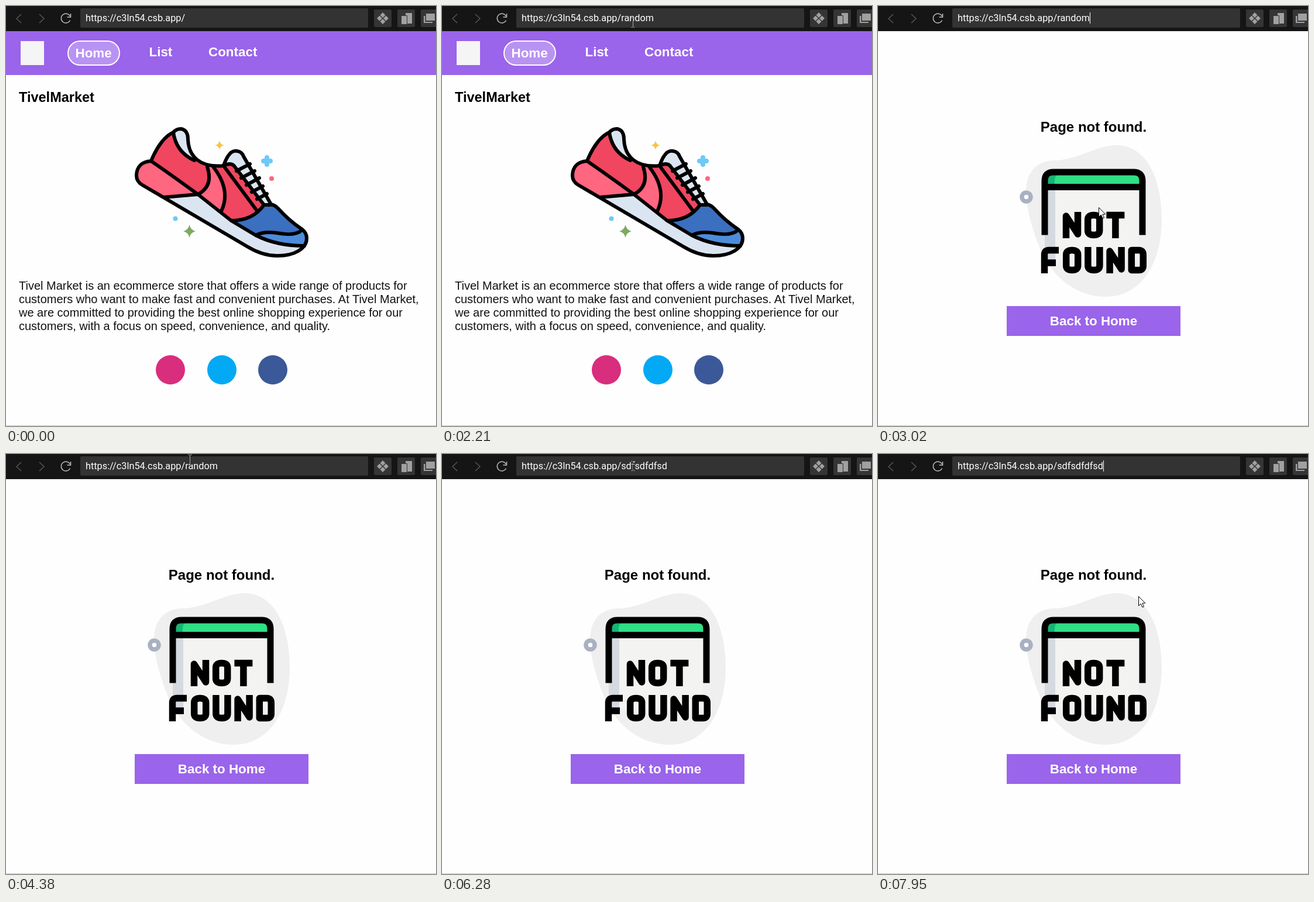
An HTML page that plays this animation: 735 px wide and 718 px high, repeating every 8000 ms.

```html
<!DOCTYPE html>
<html lang="en">
<head>
<meta charset="utf-8">
<title>Store page demo</title>
<style>
html, body { margin: 0; width: 100%; height: 100%; overflow: hidden; background: #fefefe; }
svg { display: block; font-family: "Liberation Sans", Arial, sans-serif; }
.bold { font-weight: bold; }
.nav { font-weight: bold; font-size: 22.4px; fill: #fff; }
.line { fill: none; stroke: #000; stroke-width: 6; stroke-linecap: round; stroke-linejoin: round; }
#ibeam { mix-blend-mode: difference; }
</style>
</head>
<body>
<svg width="735" height="718" viewBox="0 0 735 718">
  <rect width="735" height="718" fill="#fefefe"/>
  <rect y="717" width="735" height="1" fill="#c8c8c8"/>

  <g id="home">
    <rect y="43" width="735" height="75" fill="#9a64eb"/>
    <rect x="25" y="60" width="40" height="41" fill="#f5f5f5"/>
    <rect x="106" y="60" width="88" height="41" rx="20.5" fill="#b993f2" stroke="#fff" stroke-width="2"/>
    <g class="nav">
      <text x="118.5" y="88">Home</text>
      <text x="244.5" y="86">List</text>
      <text x="346" y="86">Contact</text>
    </g>
    <text class="bold" x="22" y="164" font-size="23.5">TivelMarket</text>

    <g id="shoe">
      <path fill="#f0465f" d="M223 290C223 275 232 266 248 265C258 238 272 222 286 215L318 262L354 276L388 270L441 340Q422 367 385 367L328 322L270 327L233 306Q223 300 223 290"/>
      <path fill="#ff6680" d="M248 265L328 322L270 327L233 306Q223 300 223 290C223 275 232 266 248 265M346 274Q354 308 328 322L368 351Q384 315 355 276Z"/>
      <path fill="#dbe5f1" d="M286 216Q291 210 299 210Q311 212 311 228Q311 248 322 264Q288 247 286 216M372 273C378 255 386 246 395 248Q403 249 406 257L453 339L441 340L390 271ZM270 327L328 322L385 367L427 392Q468 409 510 410Q494 427 462 427Q438 427 412 411Z"/>
      <path fill="#3b6fc0" d="M385 367Q422 367 441 340Q455 338 463 345Q480 363 505 381L514 393L510 410Q462 410 427 392Z"/>
      <path fill="#4d8cdb" d="M427 392Q440 385 463 388Q494 394 506 383Q520 392 510 410Q462 410 427 392"/>
      <g class="line">
        <path d="M223 290C223 275 232 266 248 265C258 240 272 222 286 216Q291 210 299 210Q311 212 311 228C312 258 333 277 372 273C378 255 386 246 395 248Q403 249 406 257L453 339Q459 340 465 346Q484 367 505 381Q514 387 514 397C514 415 493 427 464 427Q438 427 412 411L233 306Q223 300 223 290Z"/>
        <path d="M248 265Q280 287 328 322L385 367L427 392Q462 410 510 410M270 327L328 322Q355 308 344 275M286 216Q291 250 322 264M355 276Q385 315 368 351M372 273Q386 266 392 276L441 340Q422 367 385 367M374 276L429 350M441 340H453M427 392Q440 385 463 388Q494 394 506 383"/>
        <path d="M394 282L417 270M402 294L425 282M411 306L433 294M420 318L439 308M429 330L446 321"/>
      </g>
      <path fill="#fcc23f" d="M365 230Q366 237 373 238Q366 239 365 246Q364 239 357 238Q364 237 365 230"/>
      <path fill="#7fa862" d="M313.5 374Q315.5 383 324 385Q315.5 387 313.5 396Q311.5 387 303 385Q311.5 383 313.5 374"/>
      <path d="M446 259V271M440 265H452" stroke="#6dc9f7" stroke-width="8" stroke-linecap="round"/>
      <circle cx="454" cy="295" r="4" fill="#ff6680"/>
      <circle cx="289.5" cy="363.5" r="4" fill="#6dc9f7"/>
    </g>

    <g font-size="20" fill="#111">
      <text x="22" y="485">Tivel Market is an ecommerce store that offers a wide range of products for</text>
      <text x="22" y="508">customers who want to make fast and convenient purchases. At Tivel Market,</text>
      <text x="22" y="531">we are committed to providing the best online shopping experience for our</text>
      <text x="22" y="554">customers, with a focus on speed, convenience, and quality.</text>
    </g>
    <circle cx="281" cy="622" r="25" fill="#d92d7d"/>
    <circle cx="369" cy="622" r="25" fill="#03a9f4"/>
    <circle cx="456" cy="622" r="25" fill="#3b5998"/>
  </g>

  <g id="missing">
    <text class="bold" x="368.5" y="215" font-size="24" text-anchor="middle">Page not found.</text>
    <path fill="#efefef" d="M300 264C345 263 370 238 410 238C462 240 485 300 485 365C485 440 450 497 389 497C340 497 300 465 279 420C266 388 253 350 253 315C254 285 270 265 300 264"/>
    <path fill="#f3f3f1" d="M291 315H446V435H291Z"/>
    <path fill="#d5dae1" d="M285 315H303V436H285Z"/>
    <path fill="#2fdf84" d="M290 304V296Q290 289 298 289H439Q447 289 447 296V304Z"/>
    <path fill="#17b574" d="M290 304V296Q290 289 298 289H307Q302 291 302 298V304Z"/>
    <path fill="none" stroke="#000" stroke-width="11" d="M285 391.5V299Q285 284 300 284H437Q452 284 452 299V391.5M285 309.5H452"/>
    <circle cx="253.5" cy="326.5" r="7.5" fill="#fff" stroke="#a9b1c2" stroke-width="7.5"/>
    <g id="letters" fill="none" stroke="#000" stroke-width="11.5" stroke-linejoin="round"></g>
    <rect x="220" y="513" width="297" height="51" fill="#9a64eb"/>
    <text class="nav" x="368.5" y="546" text-anchor="middle">Back to Home</text>
  </g>

  <g id="browser">
    <rect width="735" height="43" fill="#151515"/>
    <rect x="127" y="4" width="492" height="33" rx="2" fill="#333"/>
    <g fill="none" stroke="#555" stroke-width="1.5">
      <path d="M26 14L18 21.5L26 29M57 14L65 21.5L57 29"/>
      <path stroke="#bbb" d="M109.5 17.5A8 8 0 1 0 109.5 24.5M110.5 13V19H104.5"/>
    </g>
    <g fill="#353535">
      <rect x="629" y="6" width="30" height="30" rx="2"/>
      <rect x="669" y="6" width="30" height="30" rx="2"/>
      <rect x="709" y="6" width="30" height="30" rx="2"/>
    </g>
    <g fill="#a0a0a0">
      <path d="M644 11L648.5 15.5L644 20L639.5 15.5ZM644 22L648.5 26.5L644 31L639.5 26.5ZM638.5 16.5L643 21L638.5 25.5L634 21ZM649.5 16.5L654 21L649.5 25.5L645 21Z"/>
      <path d="M683 12H694V30H686V16H683ZM676 17H685V31H676Z"/>
      <path d="M718 13H733V25H718ZM714 17H716.5V27H729V29H714Z"/>
    </g>
    <rect id="selection" x="306" y="11" width="56" height="19" fill="#338fff"/>
    <text id="url" x="136" y="26" font-size="16.3" fill="#fff" font-family="Roboto, sans-serif"></text>
    <rect id="caret" y="11" width="1" height="19" fill="#fff"/>
  </g>

  <path id="arrow" d="M.5 .5V16.5L4.3 13L7 19L9.5 18L6.9 12H11.8Z" fill="#fff" stroke="#000"/>
  <path id="ibeam" d="M-3 -8H-1L0 -7L1 -8H3M0 -7V7M-3 8H-1L0 7L1 8H3" fill="none" stroke="#ddd"/>
</svg>

<script>
const $ = id => document.getElementById(id);
const LOOP = 8000;

const glyphs = {
  N: 'M5.5 45V7L25.5 38V0',
  O: 'M5.5 13q0-7.5 10-7.5t10 7.5V32q0 7.5-10 7.5t-10-7.5z',
  T: 'M0 5.5H31M15.5 0V45',
  F: 'M5.5 45V13q0-7.5 7.5-7.5H30M5.5 27H25',
  U: 'M5.5 0V32q0 7.5 10 7.5t10-7.5V0',
  D: 'M5.5 5.5H18q7.5 0 7.5 7.5V32q0 7.5-7.5 7.5H5.5z'
};
const word = (text, x, y) => [...text].map((c, i) =>
  `<path d="${glyphs[c]}" transform="translate(${x + i * 37.2} ${y})"/>`).join('');
$('letters').innerHTML = word('NOT', 316, 352) + word('FOUND', 279, 412);

// Each list holds [start time, value]; a value stays until the next one.
const pages = [[0, 'home'], [2340, ''], [3020, 'missing'], [6760, ''], [7290, 'missing']];
const paths = [
  [0, ''], [870, 'r'], [940, 'ra'], [1420, 'ran'], [1490, 'rand'], [1620, 'rando'], [1680, 'random'],
  [5000, 's'], [5070, 'sd'], [5140, 'sdf'], [5200, 'sdfs'], [5270, 'sdfsd'], [5340, 'sdfsdf'],
  [5540, 'sdfsdfd'], [5610, 'sdfsdfdf'], [5680, 'sdfsdfdfsd']
];
const carets = [
  [0, 0], [670, 1], [2210, 0], [2740, 1], [3280, 0], [3810, 1], [4340, 0],
  [5000, 1], [6280, 0], [6830, 1], [7290, 0], [7820, 1]
];
const selections = [[0, 0], [4800, 1], [5000, 0]];

// Pointer way-points: time, x, y
const route = [
  [70, 609, 557], [400, 420, 230], [600, 294, 26], [670, 326, 28],
  [2545, 326, 28], [2820, 377, 344], [3700, 377, 344], [3900, 382, 310],
  [4150, 345, 140], [4320, 299, 18], [4380, 314, 9], [4520, 314, 12],
  [4590, 316, 20], [4730, 326, 25], [4800, 326, 20], [7690, 326, 20],
  [7950, 445, 243], [LOOP, 445, 243]
];

const at = (list, t) => list.findLast(([start]) => start <= t)[1];
const show = (id, on) => $(id).setAttribute('visibility', on ? 'visible' : 'hidden');

function pointer(t) {
  const i = Math.max(1, route.findIndex(([time]) => time > t));
  const [t0, x0, y0] = route[i - 1], [t1, x1, y1] = route[i];
  const p = (t - t0) / (t1 - t0);
  return [Math.round(x0 + (x1 - x0) * p), Math.round(y0 + (y1 - y0) * p)];
}

function draw(now) {
  const t = now % LOOP;
  const page = at(pages, t);
  show('home', page === 'home');
  show('missing', page === 'missing');

  $('url').textContent = 'https://c3ln54.csb.app/' + at(paths, t);
  $('caret').setAttribute('x', Math.round(136 + $('url').getComputedTextLength()));
  show('caret', at(carets, t));
  show('selection', at(selections, t));

  const [x, y] = pointer(t);
  const inBar = y < 43;
  show('arrow', t >= 70 && !inBar);
  show('ibeam', t >= 70 && inBar);
  $('arrow').setAttribute('transform', `translate(${x} ${y})`);
  $('ibeam').setAttribute('transform', `translate(${x + .5} ${y + .5})`);
  requestAnimationFrame(draw);
}
draw(performance.now());
</script>
</body>
</html>
```
